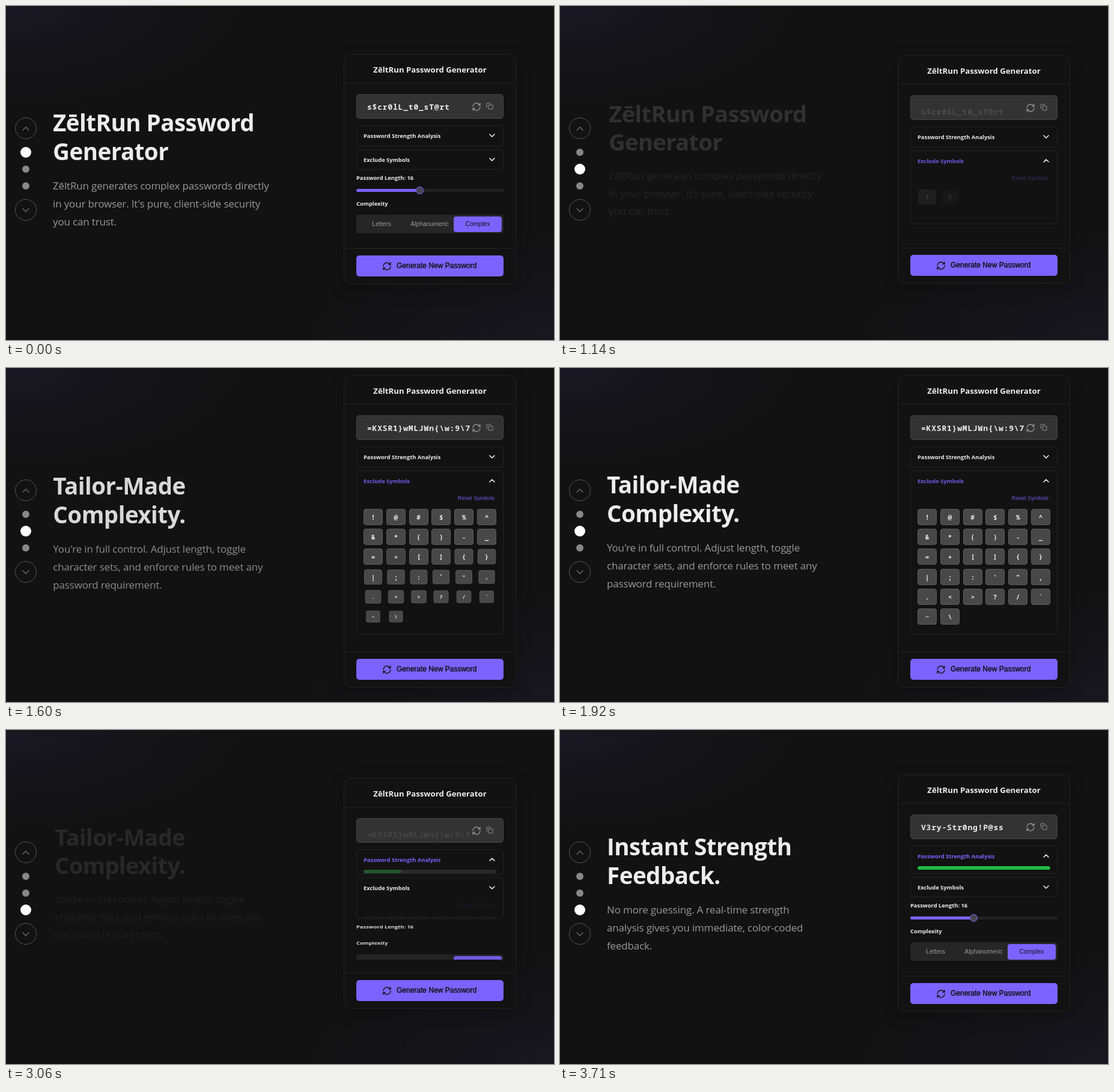
These frames come from a looping animation (912 px wide and 557 px high, 4.64 s). An HTML page:

```html
<!DOCTYPE html>
<html lang="en">
<head>
<meta charset="utf-8">
<title>Password generator</title>
<style>
  html, body { margin: 0; width: 100%; height: 100%; overflow: hidden; background: #121212; }
  #stage {
    position: relative; width: 912px; height: 557px; overflow: hidden; color: #ededed;
    font-family: "Open Sans", "Noto Sans", sans-serif;
    background:
      radial-gradient(ellipse 400px 170px at 0 0, rgba(124, 99, 255, .065), transparent),
      radial-gradient(ellipse 420px 190px at 100% 100%, rgba(124, 99, 255, .06), transparent),
      #121212;
  }
  #stage div, #stage svg, #stage span { position: absolute; box-sizing: border-box; white-space: nowrap; }
  svg { fill: none; stroke: currentColor; stroke-width: 2; stroke-linecap: round; stroke-linejoin: round; overflow: visible; }

  .nav { left: 15px; width: 36px; height: 36px; border: 1px solid #555; border-radius: 50%; color: #666; }
  .nav svg { left: 10px; top: 10px; width: 14px; height: 14px; }
  .dot { left: 27px; width: 12px; height: 12px; border-radius: 50%; }

  .slide { left: 78px; top: 170px; width: 372px; height: 206px; }
  h1 { margin: 0; font: 700 38.5px/48px "Open Sans", "Noto Sans", sans-serif; letter-spacing: -.5px; }
  p { margin: 19px 0 0; font-size: 17px; line-height: 30px; letter-spacing: -.16px; color: #999; }

  #card { left: 562px; width: 287px; border-radius: 12px; background: #121212;
    box-shadow: inset 0 0 0 1px #222, 0 8px 28px rgba(0, 0, 0, .22); }
  .title { left: 0; width: 287px; height: 49px; line-height: 52px; text-align: center;
    font-size: 13.2px; font-weight: 700; border-bottom: 1px solid #222; }
  .wide { left: 21px; width: 245px; }
  .field { top: 67px; height: 41px; border: 1px solid #444; border-radius: 5px; background: #333; color: #929292; }
  .pass { left: 17px; top: 0; line-height: 40px; color: #eee;
    font-family: "Noto Sans Mono", "DejaVu Sans Mono", monospace; font-size: 13px; font-weight: 600; letter-spacing: .8px; }
  .box { border: 1px solid #242424; border-radius: 5px; overflow: hidden; }
  .label { font-size: 9.35px; font-weight: 700; line-height: 16px; }
  .box > .label { left: 11px; top: 9px; }
  .box > svg { left: 218px; top: 9px; width: 14px; height: 14px; color: #eee; }
  .bar { left: 11px; top: 33px; width: 221px; height: 6px; border-radius: 3px; background: #2a2a2a; overflow: hidden; }
  #fill { left: 0; top: 0; height: 6px; border-radius: 3px; background: #1fb842; }
  #symbols { left: -1px; top: -1px; width: 245px; height: 272px; }
  #reset { right: 15px; top: 38px; font: 9.1px/16px "Liberation Sans", Arial, sans-serif; color: #7059e6; }
  .key { width: 32px; height: 27px; border: 1px solid #5c5c5c; border-radius: 4px; background: #484848; text-align: center;
    font: 600 11px/25px "Noto Sans Mono", "DejaVu Sans Mono", monospace; color: #eee; }
  .block { overflow: hidden; }
  .track { left: 0; top: 32px; width: 245px; height: 5px; border-radius: 2.5px; background: #222; }
  .track div { left: 0; top: 0; width: 105px; height: 5px; border-radius: 2.5px; background: #7c63ff; }
  #knob { top: 28px; width: 13px; height: 13px; border: 1.5px solid #7c63ff; border-radius: 50%; background: #474553; }
  .tabs { left: 0; top: 31px; width: 245px; height: 31px; border-radius: 5px; background: #262626; }
  .tabs div { top: 3px; width: 80px; height: 26px; border-radius: 4px; text-align: center; color: #999;
    font: 10.4px/26px "Liberation Sans", Arial, sans-serif; }
  .tabs .on { background: #7c63ff; color: #111; }
  #foot { left: 0; width: 287px; height: 60px; border-top: 1px solid #222; }
  .button { top: 11px; height: 35px; border-radius: 5px; background: #7c63ff; color: #111; }
  .button span { left: 67px; top: 0; font: 12px/35px "Liberation Sans", Arial, sans-serif; -webkit-text-stroke: .4px #111; }
</style>
</head>
<body>
<div id="stage">
  <div class="nav" style="top:186px"><svg viewBox="0 0 14 14"><path stroke-width="1.5" d="M2 10l5-5 5 5"/></svg></div>
  <div class="dot" style="top:238px"></div>
  <div class="dot" style="top:266px"></div>
  <div class="dot" style="top:294px"></div>
  <div class="nav" style="top:322px"><svg viewBox="0 0 14 14"><path stroke-width="1.5" d="M2 5l5 5 5-5"/></svg></div>

  <div class="slide"><h1>ZēltRun Password<br>Generator</h1>
    <p>ZēltRun generates complex passwords directly<br>in your browser. It's pure, client-side security<br>you can trust.</p></div>
  <div class="slide"><h1>Tailor-Made<br>Complexity.</h1>
    <p>You're in full control. Adjust length, toggle<br>character sets, and enforce rules to meet any<br>password requirement.</p></div>
  <div class="slide"><h1>Instant Strength<br>Feedback.</h1>
    <p>No more guessing. A real-time strength<br>analysis gives you immediate, color-coded<br>feedback.</p></div>

  <div id="card">
    <div class="title">ZēltRun Password Generator</div>
    <div class="wide field">
      <span class="pass">s$cr0lL_t0_sT@rt</span>
      <span class="pass">=KXSR1}wMLJWn{\w:9\7</span>
      <span class="pass">V3ry-Str0ng!P@ss</span>
      <svg class="refresh" viewBox="0 0 24 24" style="left:191px;top:12px" width="16" height="16"></svg>
      <svg viewBox="0 0 24 24" style="left:214.5px;top:12.5px" width="12" height="12"><rect x="8" y="8" width="14" height="14" rx="2"/><path d="M4 16c-1.1 0-2-.9-2-2V4c0-1.1.9-2 2-2h10c1.1 0 2 .9 2 2"/></svg>
    </div>
    <div class="wide box" id="strength" style="top:119px">
      <span class="label">Password Strength Analysis</span>
      <svg viewBox="0 0 14 14"><path d="M3 5l4 4 4-4" stroke-width="1.6"/></svg>
      <div class="bar"><div id="fill"></div></div>
    </div>
    <div class="wide box" id="exclude">
      <div id="symbols"><span id="reset">Reset Symbols</span></div>
      <span class="label">Exclude Symbols</span>
      <svg viewBox="0 0 14 14"><path d="M3 5l4 4 4-4" stroke-width="1.6"/></svg>
    </div>
    <div class="wide block" id="length">
      <span class="label" id="count" style="left:0;top:6px"></span>
      <div class="track"><div></div></div>
      <div id="knob"></div>
    </div>
    <div class="wide block" id="complexity">
      <span class="label" style="left:0;top:5px">Complexity</span>
      <div class="tabs">
        <div style="left:2px">Letters</div><div style="left:82px">Alphanumeric</div><div class="on" style="left:162px">Complex</div>
      </div>
    </div>
    <div id="foot">
      <div class="wide button">
        <svg class="refresh" viewBox="0 0 24 24" style="left:43px;top:10px" width="16" height="16"></svg>
        <span>Generate New Password</span>
      </div>
    </div>
  </div>
</div>

<script>
const LOOP = 4640, STEP1 = 940, STEP2 = 2830;
const $ = id => document.getElementById(id);
const all = sel => [...document.querySelectorAll(sel)];

const clamp = x => Math.min(1, Math.max(0, x));
const lin = (t, a, b) => clamp((t - a) / (b - a));
const out = (t, a, b) => Math.sin(lin(t, a, b) * Math.PI / 2);
const inOut = (t, a, b) => .5 - .5 * Math.cos(lin(t, a, b) * Math.PI);

for (const icon of all('.refresh'))
  icon.innerHTML = '<path d="M3 12a9 9 0 0 1 9-9 9.75 9.75 0 0 1 6.74 2.74L21 8M21 3v5h-5M21 12a9 9 0 0 1-9 9 9.75 9.75 0 0 1-6.74-2.74L3 16M8 16H3v5"/>';

const keys = [...'!@#$%^&*()-_=+[]{}|;:\'",.<>?/`~\\'].map((ch, i) => {
  const key = document.createElement('div');
  key.className = 'key';
  key.textContent = ch;
  key.style.left = 12 + i % 6 * 37.8 + 'px';
  key.style.top = 64 + Math.floor(i / 6) * 33.2 + 'px';
  $('symbols').append(key);
  return key;
});

const dots = all('.dot'), slides = all('.slide'), passes = all('.pass');
const [strengthArrow, excludeArrow] = all('.box > svg');
const [strengthLabel, excludeLabel] = all('.box > .label');
const blockLabels = all('.block > .label');

// Leaves first, then the next one enters.
function swap(list, t, enter, dur, fromY, toY, shrink) {
  list.forEach((el, i) => {
    const a = i ? inOut(t, enter[i - 1], enter[i - 1] + dur) : 1;
    const start = [STEP1, STEP2 + 20, LOOP][i];
    const b = inOut(t, start, start + 265);
    el.style.opacity = a * (1 - b);
    el.style.transform = `translateY(${fromY * (1 - a) + toY * b}px) scale(${1 - shrink * (1 - a + b)})`;
  });
}

function cardState(t) {
  if (t < STEP1) return { strength: 35, exclude: 34, length: 44, complexity: 62, pad: 25, show: 1, squash: 1 };
  if (t < STEP2) {
    const c = out(t, STEP1, 1240);
    return { strength: 35, exclude: 34 + 239 * inOut(t, 955, 1400),
      length: 34 * (1 - c), complexity: 52 * (1 - c), pad: 17 + 12 * c, show: 1 - c, squash: 1 };
  }
  const o = out(t, 2870, 3300);
  return { strength: 35 + 12 * out(t, 2900, 3340), exclude: 206 - 172 * out(t, STEP2, 3225),
    length: 44 * o, complexity: 62 * o, pad: 17 + 8 * o + 12 * (1 - lin(t, STEP2, 3000)),
    show: clamp(o * 1.4), squash: .3 + .7 * o };
}

function place(id, top, height) {
  $(id).style.top = top + 'px';
  $(id).style.height = height + 'px';
}

function drawCard(t) {
  const s = cardState(t);
  let y = 119;
  place('strength', y, s.strength);
  y += s.strength + 5;
  place('exclude', y, s.exclude);
  y += s.exclude;
  for (const id of ['length', 'complexity']) {
    place(id, y, s[id]);
    $(id).style.opacity = s.show;
    y += s[id];
  }
  for (const el of blockLabels) el.style.transform = `scaleY(${s.squash})`;
  y += s.pad;
  $('foot').style.top = y + 'px';
  const h = y + 60;
  place('card', Math.round(272.3 - h / 2), h);

  const first = t < STEP1, second = !first && t < STEP2;
  $('count').textContent = 'Password Length: ' + (second ? 20 : 16);
  $('knob').style.left = (second ? 99.5 : 98.5) + 'px';
  strengthLabel.style.color = t >= STEP2 ? '#7c63ff' : '';
  excludeLabel.style.color = second ? '#7059e6' : '';

  const turn = inOut(t, 2810, 3040);
  strengthArrow.style.transform = `rotate(${180 * turn}deg)`;
  excludeArrow.style.transform = `rotate(${180 * (inOut(t, 885, 1165) * !first - turn * (t >= STEP2))}deg)`;

  $('fill').style.width = 100 * out(t, 2940, 3600) + '%';
  $('fill').style.opacity = lin(t, 2980, 3240);
}

function drawKeys(t) {
  $('symbols').style.opacity = t < STEP1 ? 0 : 1 - lin(t, 2850, 3090);
  $('reset').style.opacity = lin(t, 1050, 1300);
  keys.forEach((key, i) => {
    const late = i >= 14;
    const start = late ? 1240 + (i - 14) * 12 : 1095 + i * 25;
    const o = lin(t, start, start + (late ? 120 : 200));
    key.style.opacity = o;
    key.style.transform = `scale(${late ? .5 + .5 * lin(t, start, start + 360) : .85 + .15 * clamp(o * 2)})`;
  });
}

function draw(t) {
  const a = inOut(t, 925, 1110), b = inOut(t, STEP2, 3000);
  [1 - a, a - b, b].forEach((on, i) => {
    const c = 136 + 119 * on;
    dots[i].style.background = `rgb(${c},${c},${c})`;
    dots[i].style.transform = `scale(${1 + .5 * on})`;
  });
  swap(slides, t, [1200, 3140], 500, 20, -19, .02);
  swap(passes, t, [1170, 3110], 450, -5, 7, 0);
  drawCard(t);
  drawKeys(t);
}

const t0 = performance.now();
function tick() {
  draw((performance.now() - t0) % LOOP);
  requestAnimationFrame(tick);
}
tick();
</script>
</body>
</html>
```
